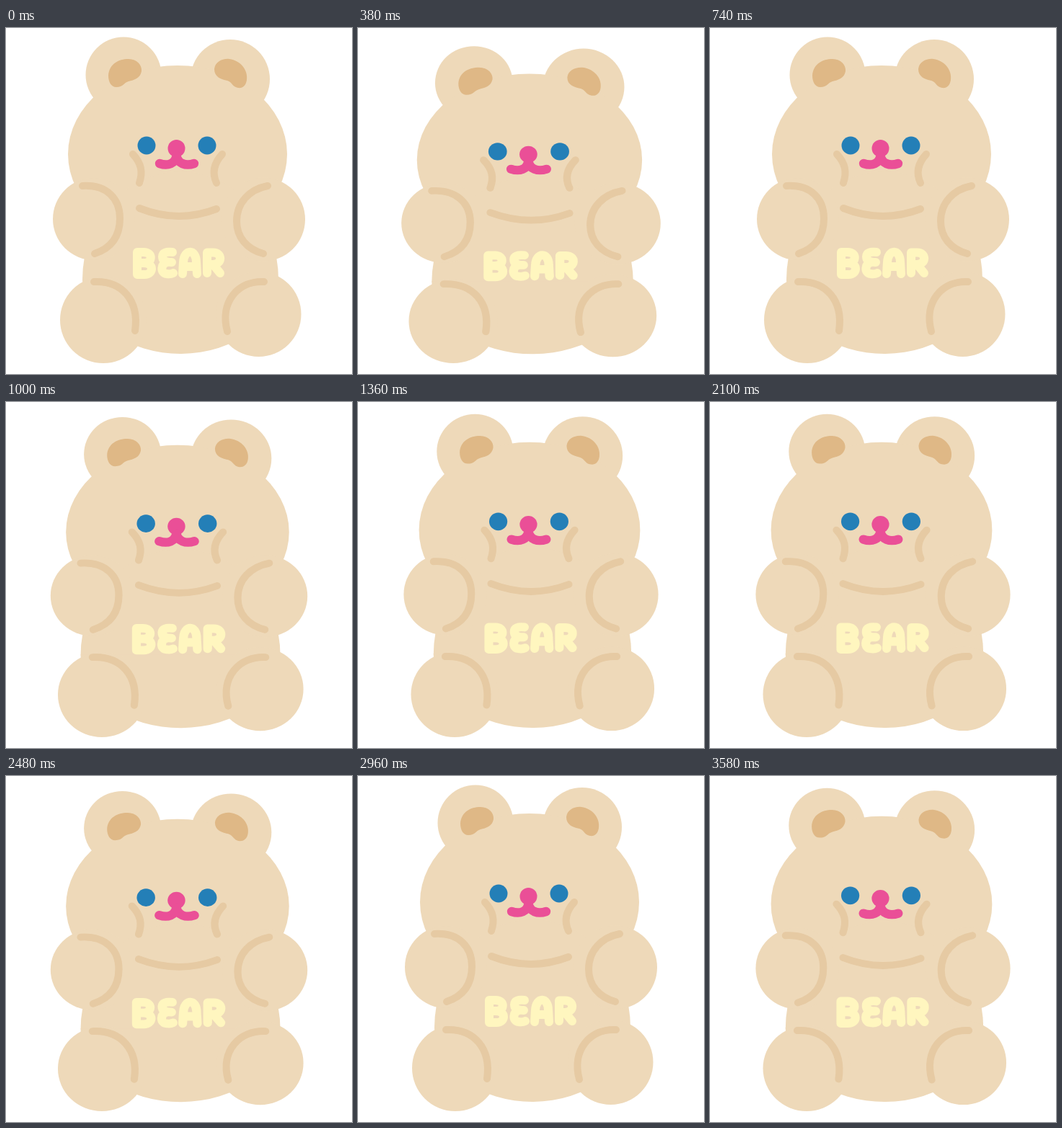
Animation of 480 by 480 pixels, one loop 3.7 s. Source, as an HTML page with a canvas:

```html
<!DOCTYPE html>
<html lang="en">
<head>
<meta charset="utf-8">
<title>Bear</title>
<style>
  html, body { margin: 0; width: 100%; height: 100%; overflow: hidden; background: #fff; }
  canvas { display: block; width: 100vw; height: 100vh; }
</style>
</head>
<body>
<canvas id="stage" width="480" height="480" role="img" aria-label="BEAR"></canvas>
<script>
const ctx = document.getElementById('stage').getContext('2d');

const FUR = '#eed9b9', CREASE = '#e6caa3', EAR = '#dfb886';
const BLUE = '#247fb7', PINK = '#ea4f97', CREAM = '#fff6bf';

// The first pose holds a little longer than the others.
const PERIOD = 740, HOLD = 140, STEP = 120, POSES = 6;
const BASE = { x: 240, y: 465 };

const earInner = [
  'M142 66C143 50 156 43 170 43C182 43 189 52 188 60C186 70 178 72 170 74C163 76 163 82 153 82C146 82 142 75 142 66Z',
  'M289 57C290 47 300 42 310 43C325 45 336 58 334 72C333 80 328 84 322 83C314 82 314 75 307 73C298 71 289 68 289 57Z'
].map(d => new Path2D(d));

const creases = new Path2D([
  'M106 219C140 217 158 237 158 264C158 288 147 305 123 313',
  'M363 219C337 224 320 243 320 268C320 290 334 307 357 313',
  'M122 352C161 350 185 378 179 420',
  'M358 352C322 350 296 380 307 421',
  'M176 175C188 188 190 200 185 215',
  'M300 175C288 188 286 202 292 215',
  'M185 250Q239 271.5 292 251'
].join(''));

const mouth = new Path2D('M213 188C225 192 235 188 236.5 177C238 188 249 192 261 188');

const lettering = new Path2D([
  'M182 311V341M182 311H191C204 311 204 326 191 326H184M191 326C206 326 205 342 192 342H182',
  'M231 311C222 310 217 312 217 317C217 323 222 325 230 325M224 325C214 326 214 341 223 341Q228 342 232 340',
  'M245 341L246 325C247 306 264 306 264 325L265 341M248 331H263',
  'M279 340V312M279 311.5H287C301 311.5 300 328 287 328H281M288 329L297 340'
].join(''));

function oval(x, y, rx, ry = rx, from = 0, to = Math.PI * 2) {
  ctx.beginPath();
  ctx.ellipse(x, y, rx, ry, 0, from, to);
  ctx.fill();
}

function line(path, color, width) {
  ctx.strokeStyle = color;
  ctx.lineWidth = width;
  ctx.stroke(path);
}

function drawBody() {
  ctx.fillStyle = FUR;
  oval(163, 65, 52.5);
  oval(311, 71, 55);
  oval(238, 175, 152, 123);
  oval(242, 349, 136, 150, Math.PI, Math.PI * 2);
  oval(242, 349, 136, 103, -0.01, Math.PI + 0.01);
  oval(122, 265, 57);
  oval(357, 265.5, 58);
  oval(135, 405, 60);
  oval(350.5, 397, 59);
}

function drawBear() {
  drawBody();
  ctx.fillStyle = EAR;
  earInner.forEach(p => ctx.fill(p));
  line(creases, CREASE, 10);
  ctx.fillStyle = BLUE;
  oval(195, 163, 12.5);
  oval(279, 163, 12.5);
  ctx.fillStyle = PINK;
  oval(236.5, 167, 12);
  line(mouth, PINK, 12.5);
  line(lettering, CREAM, 12);
}

// 0 = tall, 1 = fully squashed
function squash(time) {
  const t = time % PERIOD;
  const pose = t < HOLD ? 0 : Math.min(POSES - 1, 1 + Math.floor((t - HOLD) / STEP));
  return 1 - Math.abs(pose - POSES / 2) / (POSES / 2);
}

function render(time) {
  const s = squash(time);
  ctx.setTransform(1, 0, 0, 1, 0, 0);
  ctx.fillStyle = '#fff';
  ctx.fillRect(0, 0, 480, 480);
  ctx.lineCap = ctx.lineJoin = 'round';
  ctx.translate(BASE.x, BASE.y);
  ctx.scale(1 + 0.0275 * s, 1 - 0.028 * s);
  ctx.translate(-BASE.x, -BASE.y);
  drawBear();
}

const start = performance.now();
function tick() {
  render(performance.now() - start);
  requestAnimationFrame(tick);
}
tick();
</script>
</body>
</html>
```
